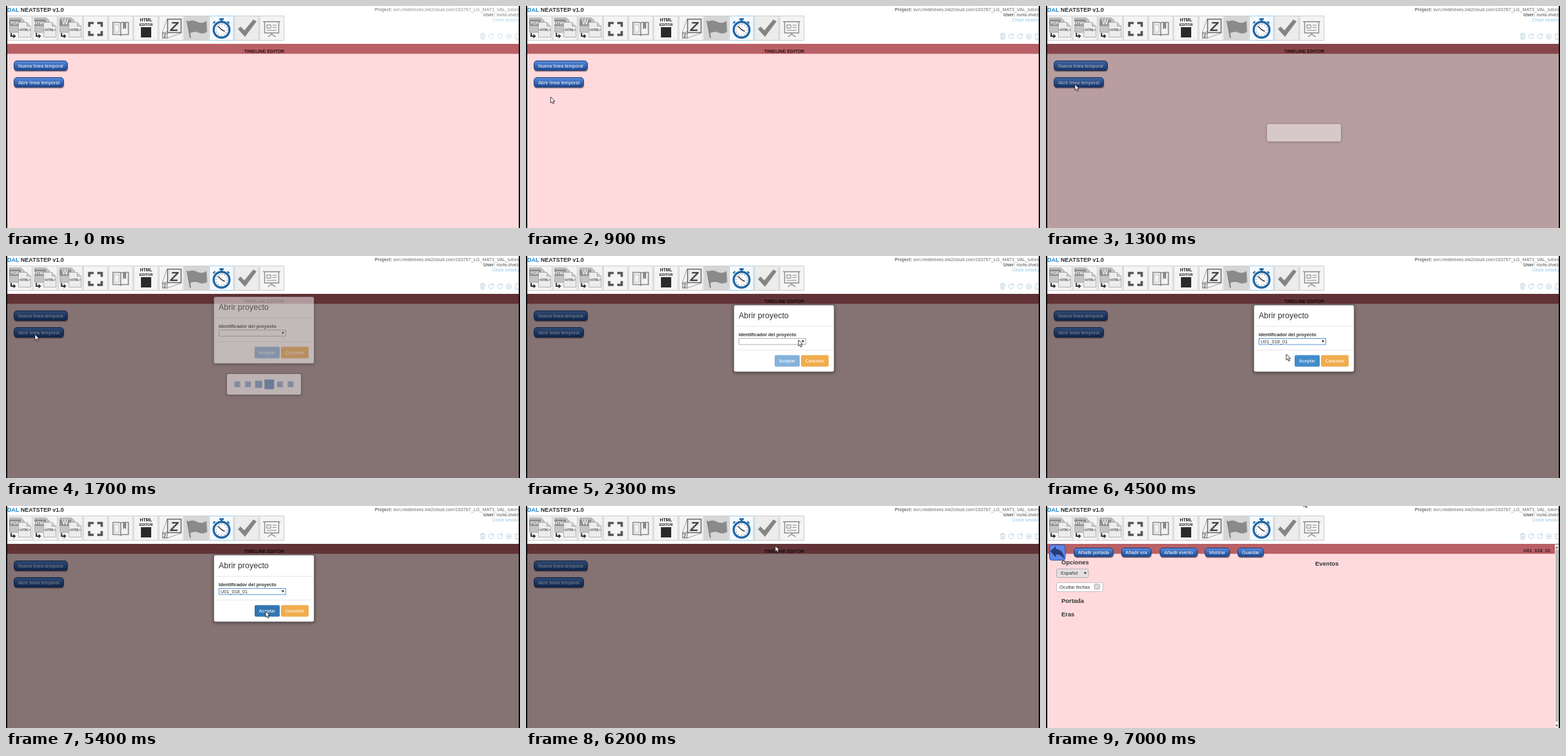
Write an HTML page that moves like this. It is 800x346 px and loops after 7100 ms.

```html
<!DOCTYPE html>
<html lang="es">
<head>
<meta charset="utf-8">
<title>Timeline editor</title>
<style>
html, body { margin: 0; width: 100%; height: 100%; overflow: hidden; background: #fff; }
svg { display: block; width: 800px; height: 346px; font: 7.35px "Liberation Sans", Arial, sans-serif; }
.b { font-weight: bold; }
.mid { text-anchor: middle; }
.line { fill: none; stroke: #888; }
.head { font-size: 9.4px; font-weight: bold; fill: #333; }
</style>
</head>
<body>
<svg id="stage" viewBox="0 0 800 346"></svg>
<script>
const LOOP = 7100, STEP = 100;

const rect = (x, y, w, h, fill, more = '') =>
  `<rect x="${x}" y="${y}" width="${w}" height="${h}" fill="${fill}" ${more}/>`;
const text = (x, y, s, fill = '#333', more = '') =>
  `<text x="${x}" y="${y}" fill="${fill}" ${more}>${s}</text>`;
const path = (d, more = 'class="line"') => `<path d="${d}" ${more}/>`;
const group = (id, body, more = '') => `<g id="${id}" ${more}>${body}</g>`;

const blueButton = (x, y, w, h, label) =>
  rect(x + .5, y + 1.6, w, h, '#402028', 'rx="4.5" opacity=".45"') +
  rect(x + .5, y + .5, w - 1, h - 1, 'url(#blue)', 'rx="4.5" stroke="#1b3d78"') +
  text(x + w / 2, y + h / 2 + 2.5, label, '#fff', 'class="mid"');

const flatButton = (id, x, w, label, fill) =>
  rect(x, 154.5, w, 18, fill, `id="${id}" rx="2"`) +
  text(x + w / 2, 166, label, '#fff', 'class="mid"');

const arrowDown = (x, y) => path(`M${x - 2} ${y}h4l-2 3.4z`, 'fill="#222"');

// Toolbar
const slot = i => 3 + 39.2 * i;

const fileIcon = (i, label) => `<g transform="translate(${slot(i)} 0)">` +
  path('M2.5 18.5h18l5 5v17.500h-23z', 'fill="#c4c4c4" stroke="#969696" stroke-width=".8"') +
  rect(2, 21, 18, 10, '#8f8f8f') +
  text(10.500, 29, label, '#f4f4f4', `class="b mid" font-size="${label.length > 1 ? 6.500 : 10}"`) +
  path('M16.500 25.5h13l6 6v17h-19z', 'fill="#ececec" stroke="#a0a0a0" stroke-width=".8"') +
  path('M29.5 25.5v6h6', 'fill="#ccc" stroke="#a0a0a0" stroke-width=".8"') +
  text(26, 39, '&lt;HTML&gt;', '#555', 'class="b mid" font-size="4.5"') +
  path('M5 42v5h4', 'fill="none" stroke="#333" stroke-width="2"') +
  path('M8.5 43.500l4 3.5l-4 3.5z', 'fill="#333"') + '</g>';

const slotFill = { 7: '#d6d6d6', 8: '#f3f9fd', 9: '#ececec' };
const boxes = Array.from({ length: 11 }, (_, i) =>
  rect(slot(i), 15.5, 37.6, 38, slotFill[i] || '#f4f4f4',
    `stroke="${i === 8 ? '#9fd0ea' : '#cbcbcb'}"`)).join('');

const clock =
  rect(332, 19, 7, 3, '#2b6ca8', 'rx="1"') + rect(334, 21, 3, 4, '#2b6ca8') +
  path('M344.5 24l3 3M325.5 24l-3 3', 'stroke="#2b6ca8" stroke-width="2.4"') +
  '<circle cx="335.5" cy="37" r="12.3" fill="#fff" stroke="#2468a6" stroke-width="3.4"/>' +
  '<circle cx="335.5" cy="37" r="8.6" fill="none" stroke="#447" stroke-width="1.6" stroke-dasharray=".8 3.703"/>' +
  path('M330 31.5l5.5 5.5l5 2.5', 'fill="none" stroke="#333" stroke-width="1.5"');

const icons = fileIcon(0, 'PDF') + fileIcon(1, 'HTML') + fileIcon(2, 'W') +
  path('M129.5 32.5v-6h7M142 26.5h7v6M149 39v6h-7M136.5 45h-7v-6', 'fill="none" stroke="#555" stroke-width="3.6"') +
  path('M166.5 25.5h9q3 0 3 2q0-2 3-2h9v19h-9q-3 0-3 2q0-2-3-2h-9zM178.5 27.5v18', 'class="line" stroke-width="1.7"') +
  path('M169 29h6.500v12h-6.500z', 'class="line" opacity=".5"') +
  path('M182 25.5h5v11l-2.500-2.500l-2.500 2.500z', 'fill="#888"') +
  text(218, 24, 'HTML', '#222', 'class="b mid" font-size="6.8"') +
  text(218, 30.5, 'EDITOR', '#222', 'class="b mid" font-size="5.6"') +
  rect(210, 33, 16, 16, '#2b2b2b') +
  path('M243 42l8-22M251 50l22-8M243 42l8-2', 'class="line" stroke-width=".8"') +
  rect(251.5, 20.5, 21, 21, '#ececec', 'stroke="#666" stroke-width="1.5"') +
  text(262, 38.5, 'Z', '#444', 'class="b mid" font-size="21" font-style="italic"') +
  rect(243.5, 42.5, 7.500, 7.500, '#eee', 'stroke="#777"') +
  text(247.2, 49, 'Z', '#555', 'class="b mid" font-size="7"') +
  path('M282 23l5 26.500', 'stroke="#808080" stroke-width="2"') +
  path('M283 24.500q7-4 14 0t15-1l1 17q-7 4-13 1t-14 1z', 'fill="#8a8a8a"') +
  clock +
  path('M361 36l4-4l6 6l14-17l5 3l-18 24z', 'fill="#858585"') +
  path('M400 24.500h27M402.500 25v17h22v-17M413.500 42v3M413.500 44l-6 4M413.500 44l6 4', 'class="line" stroke-width="1.4"') +
  path('M406 29.500h6v5h-6zM415 30h6M415 33.500h6M406 38h15', 'class="line" stroke-width="1.1"');

const reload = x => path(`M${x + 2.8} 44.500a3.800 3.800 0 1 0 1 3M${x + 3.300} 43v2.500h-2.500`, '');
const account =
  text(574, 8, '<tspan class="b">Project:</tspan> svn://edelvives.ink2cloud.com/163767_LG_MAT3_VAL_tutorial', '#6a6a6a', 'font-size="7.2"') +
  text(743, 16, '<tspan class="b">User:</tspan> nuria.olvez', '#555', 'font-size="7.2"') +
  text(756.500, 24, 'Close session', '#8fc3e4', 'font-size="7.2"') +
  '<g fill="none" stroke="#b4cddd" stroke-width=".9">' +
  path('M738 44.500h8M740.500 44v-1.300h3v1.300M739 45l.5 6.500h5l.5-6.500M741 46.500v3.500M743 46.500v3.500', '') +
  reload(755) + reload(769) +
  '<circle cx="782.500" cy="47.500" r="3.900"/>' + path('M782.500 45.500v4M780.500 47.500h4', '') +
  path('M793 43.500h4l3 3v5h-7z', '') + '</g>';

const topBar = rect(0, 0, 800, 59, '#fff') +
  text(2, 9, '<tspan fill="#1b82c5">DAL</tspan> NEATSTEP v1.0', '#2b2b2b', 'class="b" font-size="9"') +
  boxes + icons + group('account', account);

// Views
const home =
  text(402, 73, 'TIMELINE EDITOR', '#2c1416', 'class="b mid" font-size="7.2"') +
  blueButton(12, 85, 84, 16, 'Nueva línea temporal') +
  blueButton(12, 111, 78, 16, 'Abrir línea temporal');

const editor =
  rect(5.500, 60.500, 24.500, 24, '#5c86e6', 'rx="4" stroke="#33509a"') +
  path('M7 70.500l8-7v4q11 0 13 14q-5-7-13-6.500v4z', 'fill="#2a3c78" stroke="#1c2a58" stroke-width=".6"') +
  [[43, 62, 'Añadir portada'], [117, 47, 'Añadir era'], [177, 59, 'Añadir evento'],
   [247, 39, 'Mostrar'], [298, 41, 'Guardar']]
    .map(([x, w, s]) => blueButton(x, 65, w, 14.500, s)).join('') +
  text(743, 72, 'U01_018_01', '#3a1c1e', 'class="b"') +
  [[24, 91, 'Opciones'], [419, 93, 'Eventos'], [24, 151, 'Portada'], [24, 172, 'Eras']]
    .map(([x, y, s]) => text(x, y, s, '#333', 'class="head"')).join('') +
  rect(16.500, 98, 49.500, 13.500, '#e4dfe0', 'rx="2" stroke="#b5aeb0"') +
  text(23, 107.300, 'Español') + arrowDown(61, 103.200) +
  rect(16.500, 119.500, 72, 14, '#fff', 'rx="2" stroke="#c9bcbe"') +
  text(21, 129, 'Ocultar fechas') +
  rect(75.500, 122, 8, 7.500, '#ddd', 'rx="1" stroke="#a5a5a5"') +
  rect(792, 60, 6, 286, '#f1f1f1') + rect(793, 68, 4.500, 268, '#b9b9b9') +
  path('M793 66h4l-2-3zM793 341h4l-2 3z', 'fill="#555"');

const loader = rect(344, 185, 115, 27, '#000', 'class="panel" rx="3" opacity=".5" filter="url(#soft)"') +
  rect(344, 184, 115, 27, '#f6f4f4', 'class="panel" rx="3"') +
  Array.from({ length: 6 }, () => '<rect class="dot" fill="#4f86bd"/>').join('');

const dialog = rect(323, 77, 157, 105, '#000', 'rx="3" opacity=".5" filter="url(#soft)"') +
  rect(323.500, 76.500, 156, 104, '#fff', 'rx="3" stroke="#555" stroke-opacity=".5"') +
  text(331, 97, 'Abrir proyecto', '#333', 'font-size="12.500"') +
  path('M324 109.500h155M324 146.500h155', 'stroke="#e7e7e7"') +
  text(331, 125, 'Identificador del proyecto', '#333', 'class="b"') +
  rect(331.500, 128.500, 104, 9.500, '#fff', 'id="field" stroke="#b0b0b0"') +
  arrowDown(431, 131.500) +
  text(334, 136, 'U01_018_01', '#333', 'id="value"') +
  flatButton('accept', 387, 39, 'Aceptar', '#85b2db') +
  flatButton('cancel', 428, 43, 'Cancelar', '#f0ad4e') +
  group('list', rect(331.500, 138.500, 104, 18, '#fff', 'stroke="#888"') +
    rect(332, 147.500, 103, 8.500, '#1e80e8') + text(334, 154.500, 'U01_018_01', '#fff'));

const $ = id => document.getElementById(id);
$('stage').innerHTML =
  `<defs><linearGradient id="blue" x2="0" y2="1">
    <stop stop-color="#5a8ee0"/><stop offset="1" stop-color="#1c478f"/></linearGradient>
    <filter id="soft" x="-20%" y="-30%" width="140%" height="160%"><feGaussianBlur stdDeviation="2.500"/></filter></defs>` +
  rect(0, 0, 800, 346, '#ffdadc') + rect(0, 59, 800, 15.500, '#b96066') +
  group('home', home) + group('editor', editor) +
  rect(0, 59, 800, 287, '#000', 'id="dim"') + topBar +
  rect(0, 0, 2, 346, '#0b0b10') + rect(798, 0, 2, 346, '#0b0b10') +
  group('loader', loader) + group('dialog', dialog) +
  group('cursor', path('M0 0V9.300L2.200 7.300 3.700 10.800 5.300 10.100 3.800 6.700H6.600Z',
    'fill="#fff" stroke="#111" stroke-width=".8"'));

// Each key is [time, ...values], linear in between
const tracks = {
  dim: [[1100, 0], [1200, .12], [1300, .28], [1400, .48], [6300, .48], [6600, 0]],
  loader: [[1200, 0, 27], [1300, .5, 27], [1400, 1, 32], [1600, 1, 32], [1800, 0, 32]],
  dialog: [[1500, 0, -26], [1900, 1, 0], [5900, 1, 0], [6100, 0, -20]],
  cursor: [[200, -8, 280], [1000, 45, 122], [2000, 45, 122], [2300, 424, 131], [2800, 424, 131],
    [3500, 400, 149], [3800, 358, 150], [4000, 358, 150], [4200, 374, 153], [4500, 374, 153],
    [5000, 404, 164], [5900, 404, 164], [6200, 388, 62], [6400, 398, 0], [6600, 399, -1], [7000, 401, -8]]
};

function at(name, t) {
  const keys = tracks[name];
  const i = keys.findIndex(k => k[0] > t);
  if (i < 0) return keys[keys.length - 1].slice(1);
  if (i === 0) return keys[0].slice(1);
  const [a, b] = [keys[i - 1], keys[i]];
  const p = (t - a[0]) / (b[0] - a[0]);
  return a.slice(1).map((v, j) => v + (b[j + 1] - v) * p);
}

const set = (id, name, value) => $(id).setAttribute(name, value);
const show = (id, on) => set(id, 'visibility', on ? 'inherit' : 'hidden');
const dots = [...document.querySelectorAll('.dot')];
const panels = [...document.querySelectorAll('.panel')];

function draw(t) {
  const [alpha, dy] = at('dialog', t);
  const [glow, height] = at('loader', t);
  const picked = t >= 3400;
  set('account', 'opacity', t < 300 ? .75 : 1);
  set('dim', 'opacity', at('dim', t)[0]);
  set('loader', 'opacity', glow);
  panels.forEach(panel => panel.setAttribute('height', height));
  set('dialog', 'opacity', alpha);
  set('dialog', 'transform', `translate(0 ${dy})`);
  set('cursor', 'transform', `translate(${at('cursor', t).join(' ')})`);
  show('home', t < 6400);
  show('editor', t >= 6400);
  show('list', t >= 3000 && !picked);
  show('value', picked);
  set('field', 'stroke', t >= 2700 ? '#5b93d3' : '#b0b0b0');
  set('accept', 'fill', !picked ? '#85b2db' : t >= 4900 ? '#3276b1' : '#428bca');
  dots.forEach((dot, i) => {
    const age = (t - 1400) / 100 - i;
    const pulse = Math.max(0, age < 0 ? 1 + age : 1 - age * .65);
    const size = 9 + 6 * pulse;
    dot.setAttribute('x', 360 + 16.600 * i - size / 2);
    dot.setAttribute('y', 200 - size / 2);
    dot.setAttribute('width', size);
    dot.setAttribute('height', size);
    dot.setAttribute('opacity', t < 1400 ? 0 : .7 + .3 * pulse);
  });
}

const start = performance.now();
function tick() {
  const t = (performance.now() - start) % LOOP;
  draw(Math.floor(t / STEP) * STEP);
  requestAnimationFrame(tick);
}
tick();
</script>
</body>
</html>
```
